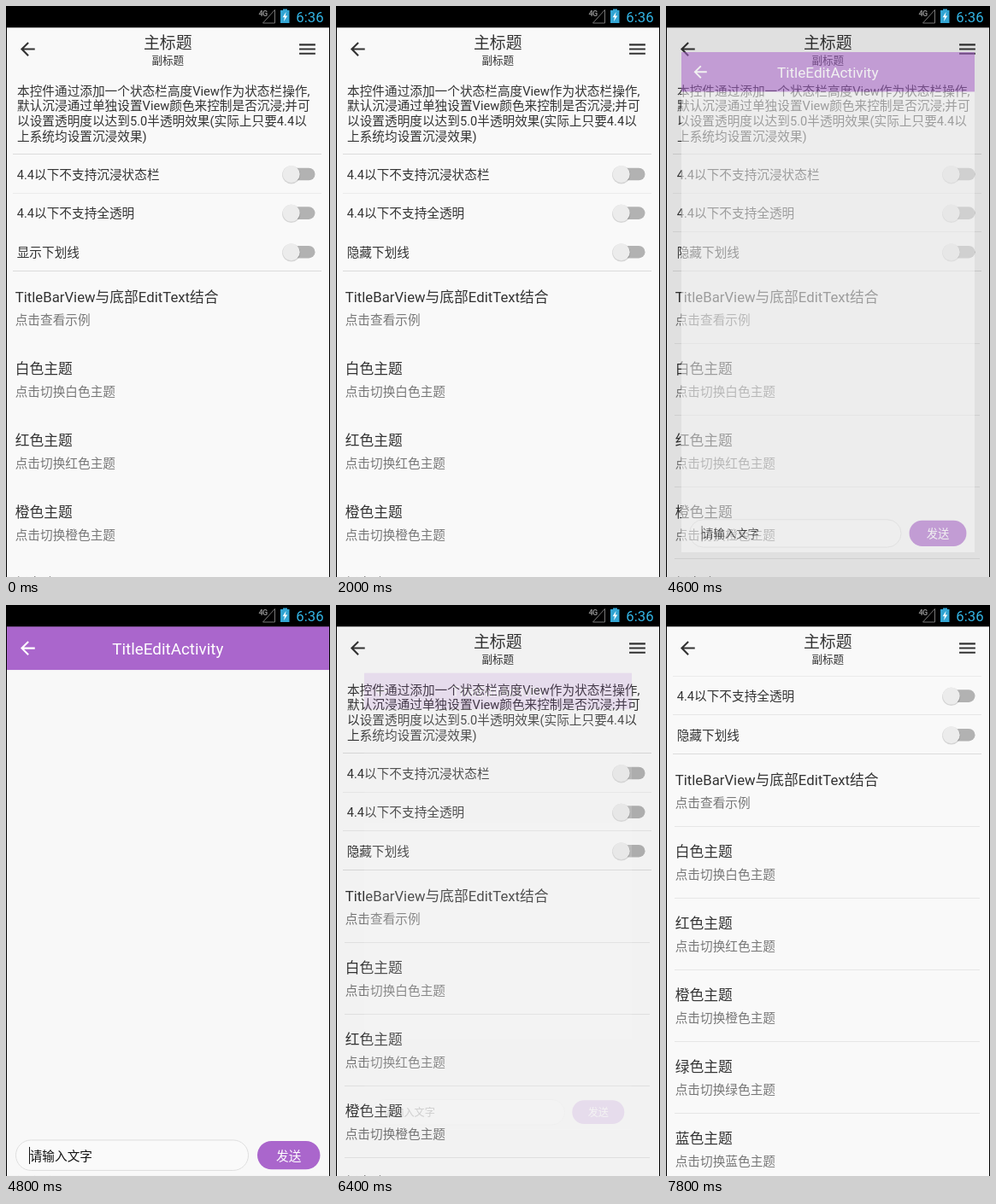
Write an HTML page that moves like this. It is 379 px wide and 669 px high and loops after 8000 ms.

```html
<!DOCTYPE html>
<html lang="zh-CN">
<head>
<meta charset="utf-8">
<title>TitleBarView</title>
<style>
html, body { margin: 0; width: 100%; height: 100%; overflow: hidden; background: #000; }
svg { display: block; width: 379px; height: 669px; }
text { font-family: Roboto, "Noto Sans CJK SC", "Noto Sans CJK", "Noto Sans CJK JP", sans-serif; font-size: 14.66px; fill: #333; }
text.head { font-size: 18.85px; }
text.title { font-size: 16.75px; }
text.small { font-size: 12.57px; }
text.hint { fill: #777; }
text.light { fill: #fff; }
.mid { text-anchor: middle; }
</style>
</head>
<body>
<svg viewBox="0 0 379 669" xmlns="http://www.w3.org/2000/svg">
  <defs>
    <clipPath id="screen"><rect x="1" y="25" width="377" height="644"/></clipPath>
    <clipPath id="body"><rect x="1" y="76" width="377" height="593"/></clipPath>
  </defs>
  <rect width="379" height="669" fill="#000"/>
  <g clip-path="url(#screen)">
    <g id="home">
      <rect x="1" y="25" width="377" height="644" fill="#f9f9f9"/>
      <g clip-path="url(#body)"><g id="list"></g></g>
      <path class="back" fill="#333"/>
      <path fill="#333" transform="translate(339.9 38) scale(1.047)" d="M3 18h18v-2H3zM3 13h18v-2H3zM3 6v2h18V6z"/>
      <text class="head mid" x="189.3" y="49.5">主标题</text>
      <text class="small mid" x="189.3" y="68">副标题</text>
    </g>
    <g id="edit">
      <rect x="1" y="25" width="377" height="644" fill="#f8f8f8"/>
      <rect x="1" y="25" width="377" height="51" fill="#aa66cc"/>
      <path class="back" fill="#fff"/>
      <text class="head light mid" x="189.3" y="57.7">TitleEditActivity</text>
      <rect x="11.5" y="627" width="272" height="35.5" rx="17.7" fill="#fafafa" stroke="#dedede"/>
      <text x="27.7" y="650.6" style="fill:#111">请输入文字</text>
      <rect id="caret" x="27" y="635" width="1" height="20" fill="#111"/>
      <rect x="294" y="628" width="73.5" height="33.3" rx="16.6" fill="#aa66cc"/>
      <text class="light mid" x="330.8" y="650.6">发送</text>
    </g>
    <rect x="1" y="25" width="377" height="1" opacity=".3"/>
  </g>
  <g id="status">
    <text x="295.5" y="11.5" style="font-size:9px;font-weight:700;fill:#8a8a8a" letter-spacing="-.6">4G</text>
    <path d="M314.5 4.5V20H300.5Z" fill="none" stroke="#777"/>
    <path d="M324 3.5h5v1.5h2.5v15h-10.5v-15h3z" fill="#33a5d3"/>
    <path d="M327.6 7l-4 6.2h2.4l-1 4.8 4.2-6.5h-2.5z" fill="#fff"/>
    <text class="title" x="339.3" y="18.5" style="fill:#33b5e5">6:36</text>
  </g>
</svg>
<script>
const LOOP = 8000, STEP = 100;
const $ = id => document.getElementById(id);
const label = (x, y, s, cls = '', id = '') => `<text x="${x}" y="${y}" class="${cls}" id="${id}">${s}</text>`;
const line = (x1, x2, y, color) => `<rect x="${x1}" y="${y}" width="${x2 - x1}" height="1" fill="${color}"/>`;

const intro = [
  '本控件通过添加一个状态栏高度View作为状态栏操作,',
  '默认沉浸通过单独设置View颜色来控制是否沉浸;并可',
  '以设置透明度以达到5.0半透明效果(实际上只要4.4以',
  '上系统均设置沉浸效果)'
];
const options = ['4.4以下不支持沉浸状态栏', '4.4以下不支持全透明', '显示下划线'];
const rows = [['TitleBarView与底部EditText结合', '点击查看示例']];
for (const c of '白红橙绿蓝') rows.push([c + '色主题', `点击切换${c}色主题`]);

const toggle = y => `<g class="toggle">
  <rect x="327" y="${y - 7.3}" width="34.5" height="14.6" rx="7.3" fill="#b2b2b2"/>
  <g><circle cx="333.7" cy="${y + .8}" r="10.6" opacity=".14"/>
  <circle class="thumb" cx="333.7" cy="${y}" r="10" fill="#ececec"/></g></g>`;

function build() {
  let out = '<rect id="pressed" x="1" y="311" width="377" height="84" fill="#d9d9d9"/>';
  let thin = line(8, 369, 264, '#e6e6e6');
  intro.forEach((s, i) => out += label(13, 104.8 + i * 17.6, s));
  out += line(8, 369, 173, '#dcdcdc') + line(8, 369, 219, '#ebebeb') + line(8, 369, 310, '#dcdcdc');
  options.forEach((s, i) => {
    const y = 197 + i * 45.6;
    out += label(12.7, y + 5.5, s, '', 'opt' + i) + toggle(y);
  });
  rows.forEach(([a, b], i) => {
    const y = i * 84;
    out += label(10.7, 346.7 + y, a, 'title') + label(10.7, 373 + y, b, 'hint');
    thin += line(10, 367, 395 + y, '#e6e6e6');
  });
  $('list').innerHTML = out + `<g id="thin">${thin}</g>`;
  for (const p of document.querySelectorAll('.back')) {
    p.setAttribute('d', 'M20 11H7.83l5.59-5.59L12 4l-8 8 8 8 1.41-1.41L7.83 13H20z');
    p.setAttribute('transform', 'translate(12.8 38) scale(1.047)');
  }
}
build();

const [track, thumb] = document.querySelectorAll('.toggle')[2].children;
const knob = thumb.querySelector('.thumb');
const ease = (t, from, span, pow) => 1 - (1 - Math.min(1, Math.max(0, (t - from) / span))) ** pow;
const mix = (a, b, k) => `rgb(${a.map((v, i) => Math.round(v + (b[i] - v) * k))})`;
const show = (id, on) => $(id).setAttribute('visibility', on ? 'inherit' : 'hidden');

function draw(ms) {
  const t = Math.floor(ms / STEP) * STEP;

  const on = ease(t, 440, 250, 2) - ease(t, 1740, 250, 2);
  thumb.setAttribute('transform', `translate(${21.5 * on} 0)`);
  track.setAttribute('fill', mix([178, 178, 178], [225, 205, 235], on));
  knob.setAttribute('fill', mix([236, 236, 236], [170, 102, 204], on));
  $('opt2').textContent = t < 1800 ? '显示下划线' : '隐藏下划线';

  show('pressed', t >= 4400 && t < 4600);
  show('thin', t >= 4600);

  // window zooms and fades in, later back out
  const p = ease(t, 4530, 300, 3) - ease(t, 6260, 300, 3);
  const s = .8 + .2 * p;
  $('edit').setAttribute('opacity', p < .02 ? 0 : p);
  $('edit').setAttribute('transform', `translate(189.5 347) scale(${s}) translate(-189.5 -347)`);
  $('home').setAttribute('opacity', 1 - .18 * p);
  show('caret', t < 5100 || (t >= 5500 && t < 6000));

  const scroll = t < 7400 ? 0 : 28 + 27 * Math.min(4, (t - 7400) / STEP);
  $('list').setAttribute('transform', `translate(0 ${-scroll})`);
}

const start = performance.now();
function tick() {
  draw((performance.now() - start) % LOOP);
  requestAnimationFrame(tick);
}
tick();
</script>
</body>
</html>
```
